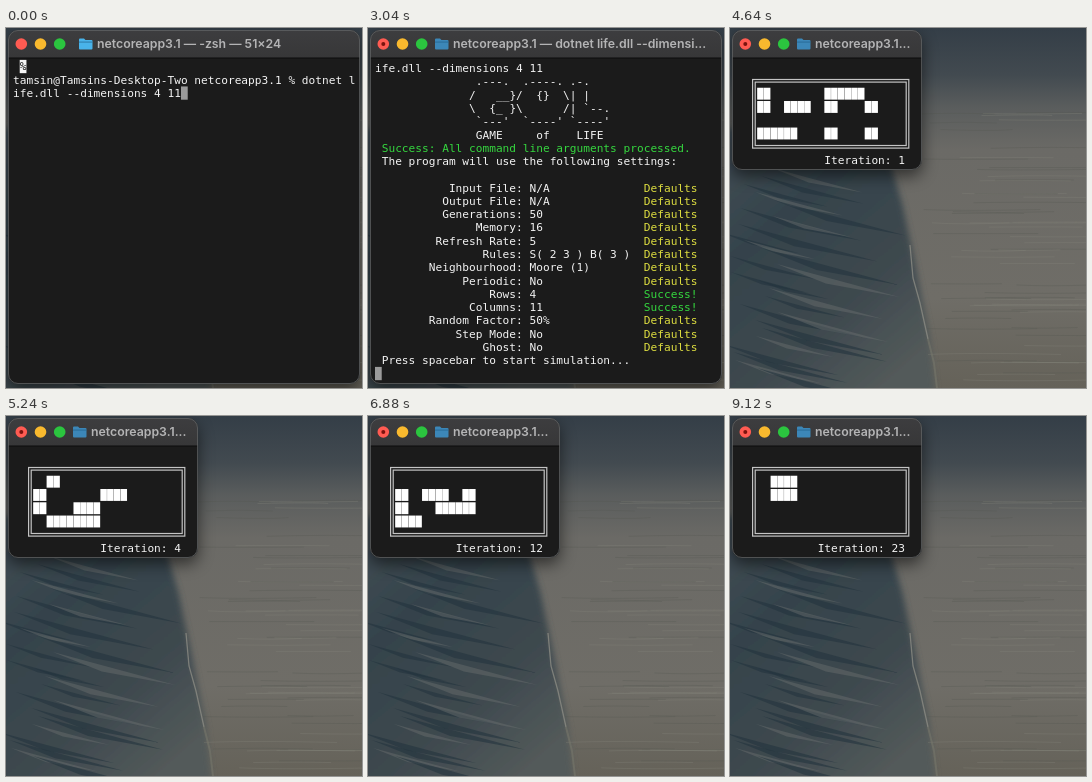
These frames come from a looping animation (356 px wide and 360 px high, 9160 ms). An HTML page:

```html
<!DOCTYPE html>
<html lang="en">
<head>
<meta charset="utf-8">
<title>Life in the terminal</title>
<style>
  html, body { margin: 0; width: 100%; height: 100%; overflow: hidden; background: #343d45; }
  svg { display: block; width: 100vw; height: 100vh; }
  text { white-space: pre; }
  .mono { font: 11.16px "DejaVu Sans Mono", monospace; fill: #f4f4f4; }
  .title { font: 600 12.3px Inter, sans-serif; fill: #b4b4b5; }
</style>
</head>
<body>
<svg id="stage" viewBox="0 0 356 360" preserveAspectRatio="none">
  <defs>
    <linearGradient id="sand" x2="0" y2="1">
      <stop offset="0" stop-color="#343e47"/>
      <stop offset=".13" stop-color="#424a50"/>
      <stop offset=".22" stop-color="#5a5d5d"/>
      <stop offset=".34" stop-color="#6b6a66"/>
      <stop offset=".75" stop-color="#6f6d67"/>
      <stop offset="1" stop-color="#656259"/>
    </linearGradient>
    <linearGradient id="slope" x2=".7" y2="1">
      <stop offset="0" stop-color="#434e55"/>
      <stop offset=".35" stop-color="#35434c"/>
      <stop offset=".7" stop-color="#3d484e"/>
      <stop offset="1" stop-color="#535a5a"/>
    </linearGradient>
    <linearGradient id="bar" x2="0" y2="1">
      <stop offset="0" stop-color="#3d3d3f"/>
      <stop offset="1" stop-color="#373738"/>
    </linearGradient>
    <filter id="soft" x="-20%" y="-20%" width="140%" height="140%"><feGaussianBlur stdDeviation="3"/></filter>
    <filter id="shade" x="-20%" y="-20%" width="140%" height="150%"><feGaussianBlur stdDeviation="8"/></filter>
  </defs>
  <g id="desk">
    <rect width="356" height="360" fill="url(#sand)"/>
    <path d="M-10 100H150L172 175L186 240L200 310L206 370H-10Z" fill="url(#slope)" filter="url(#soft)"/>
    <g id="streaks"/>
    <path d="M180 217L183 250L190 275L198 311" fill="none" stroke="#8b8b84" stroke-width="1.3" opacity=".8"/>
    <path d="M198 311L204 335L207 360" fill="none" stroke="#77766a" stroke-width="2" opacity=".6"/>
  </g>
</svg>
<script>
const LOOP = 9160, ENTER = 1000, OUTPUT = 1120, SHRINK = 4380, START = 4590, TICK = 205;
const COL = 6.72, ROW = 13.27, LEFT = 7;
const GREEN = '#35d83f', YELLOW = '#dede40';
const stage = document.getElementById('stage');

function el(parent, tag, attrs, content) {
  const node = document.createElementNS('http://www.w3.org/2000/svg', tag);
  for (const k in attrs) node.setAttribute(k, attrs[k]);
  if (content !== undefined) node.textContent = content;
  parent.appendChild(node);
  return node;
}
const group = parent => el(parent, 'g', {});
const rect = (parent, x, y, width, height, fill) => el(parent, 'rect', { x, y, width, height, fill });
const show = (node, on) => { node.style.display = on ? '' : 'none'; };
const colX = col => LEFT + col * COL;

// Character grid whose first row is centred on y = top
function print(parent, top, row, col, str, fill) {
  const node = el(parent, 'text', { class: 'mono', x: colX(col), y: top + row * ROW + 3.9 }, str);
  if (fill) node.style.fill = fill;
  return node;
}
function block(parent, top, row, col, fill) {
  return rect(parent, colX(col), top + row * ROW - 6.6, COL, ROW, fill);
}

function frame(w, h) {
  const g = group(stage);
  el(g, 'rect', { x: 2, y: 8, width: w, height: h, rx: 10, fill: '#000', opacity: .55, filter: 'url(#shade)' });
  el(g, 'rect', { x: 2, y: 2, width: w, height: h, rx: 10, fill: '#1b1b1b' });
  el(g, 'path', { d: `M2 30V12a10 10 0 0 1 10-10h${w - 20}a10 10 0 0 1 10 10V30Z`, fill: 'url(#bar)' });
  rect(g, 2, 29.5, w, 1, '#0c0c0c');
  el(g, 'rect', { x: 2.5, y: 2.5, width: w - 1, height: h - 1, rx: 9.5, fill: 'none', stroke: '#626466', 'stroke-opacity': .75 });
  ['#ff5b52', '#f9b92e', '#2bc53f'].forEach((fill, i) =>
    el(g, 'circle', { cx: 15.3 + i * 19.2, cy: 16, r: 5.8, fill }));
  return g;
}
function heading(parent, x, str, blue, busy) {
  const g = group(parent);
  el(g, 'path', { d: `M${x} 11.5q0-1 1-1h4l1.5 1.5h6q1 0 1 1v7.5q0 1-1 1h-11.500q-1 0-1-1Z`, fill: blue });
  rect(g, x, 13.7, 13.5, .7, '#1f5f88');
  el(g, 'text', { class: 'title', x: x + 18, y: 20.4 }, str);
  if (busy) el(g, 'circle', { cx: 15.3, cy: 16, r: 2, fill: '#7c130e' });
  return g;
}

function drawStreaks() {
  let seed = 7;
  const rnd = () => (seed = seed * 16807 % 2147483647) / 2147483647;
  const g = document.getElementById('streaks');
  for (let i = 0; i < 60; i++) {
    const y = 85 + rnd() * 270, x = 185 + rnd() * 110;
    el(g, 'path', { d: `M${x} ${y}q${30 + rnd() * 30} ${rnd() * 4 - 2} ${60 + rnd() * 80} 0`,
      fill: 'none', stroke: i % 2 ? '#86847b' : '#55564f', 'stroke-width': 1, opacity: .3 });
  }
  for (let i = 0; i < 26; i++) {
    const y = 140 + i * 8, x = -10 + rnd() * 60, len = 70 + rnd() * 75;
    el(g, 'path', { d: `M${x} ${y}l${len} ${len * .27}l${-len * .6} ${-len * .11}Z`,
      fill: i % 3 ? '#24343f' : '#6a7070', opacity: i % 3 ? .6 : .45 });
  }
}

// Large window: prompt, then settings
drawStreaks();
const big = frame(352, 354);
const zsh = heading(big, 73, 'netcoreapp3.1 — -zsh — 51×24', '#49b3ea', false);
const run = heading(big, 67, 'netcoreapp3.1 — dotnet life.dll --dimensi...', '#3c87b8', true);

const prompt = group(big), TOP = 38.5;
block(prompt, TOP, 0, 1, '#f4f4f4');
print(prompt, TOP, 0, 1, '%', '#111');
print(prompt, TOP, 1, 0, 'tamsin@Tamsins-Desktop-Two netcoreapp3.1 % dotnet l');
print(prompt, TOP, 2, 0, 'ife.dll --dimensions 4 11');
const caret = block(prompt, TOP, 2, 25, '#9b9b9b');
const caretNext = block(prompt, TOP, 3, 0, '#9b9b9b');

const output = group(big), TOP2 = 40.3;
print(output, TOP2, 0, 0, 'ife.dll --dimensions 4 11');
[
  " .---.  .----. .-.",
  "/   __}/  {}  \\| |",
  "\\  {_ }\\      /| `--.",
  " `---'  `----' `----'",
  " GAME     of    LIFE"
].forEach((line, i) => print(output, TOP2, i + 1, 14, line));
print(output, TOP2, 6, 1, 'Success: All command line arguments processed.', GREEN);
print(output, TOP2, 7, 1, 'The program will use the following settings:');
[
  ['Input File', 'N/A'], ['Output File', 'N/A'], ['Generations', '50'], ['Memory', '16'],
  ['Refresh Rate', '5'], ['Rules', 'S( 2 3 ) B( 3 )'], ['Neighbourhood', 'Moore (1)'],
  ['Periodic', 'No'], ['Rows', '4', true], ['Columns', '11', true],
  ['Random Factor', '50%'], ['Step Mode', 'No'], ['Ghost', 'No']
].forEach(([name, value, given], i) => {
  print(output, TOP2, i + 9, 0, (name + ':').padStart(22) + ' ' + value);
  print(output, TOP2, i + 9, 40, given ? 'Success!' : 'Defaults', given ? GREEN : YELLOW);
});
print(output, TOP2, 22, 1, 'Press spacebar to start simulation...');
block(output, TOP2, 23, 0, '#9b9b9b');

// Small window: the simulation
const small = frame(190, 140), TOP3 = 39.1;
heading(small, 67, 'netcoreapp3.1...', '#3c87b8', true);
[[22.6, 51.5, 156.2, 68.6], [25.2, 54.1, 151, 63.4]].forEach(([x, y, width, height]) =>
  el(small, 'rect', { x, y, width, height, fill: 'none', stroke: '#c4c4c4', 'stroke-width': 1.2 }));
const label = print(small, TOP3, 7, 0, '');

const first = ['10000111000', '10110100100', '00000000000', '11100100100'].map(r => [...r].map(Number));
function step(cells) {
  return cells.map((line, r) => line.map((alive, c) => {
    let n = -alive;
    for (let y = r - 1; y <= r + 1; y++)
      for (let x = c - 1; x <= c + 1; x++) n += cells[y]?.[x] || 0;
    return +(n === 3 || (alive && n === 2));
  }));
}
const history = [first];
while (history.length < 24) history.push(step(history[history.length - 1]));

const cellNodes = first.map((line, r) => line.map((_, c) => {
  const g = group(small);
  for (const half of [0, 1])
    rect(g, colX(3 + c * 2 + half), TOP3 + (r + 2) * ROW - 5.9, COL - .2, 11.9, '#fff');
  return g;
}));

function draw(t) {
  const sim = t >= SHRINK, busy = t >= ENTER, printed = t >= OUTPUT;
  show(big, !sim);
  show(small, sim);
  show(zsh, !busy);
  show(run, busy);
  show(prompt, !printed);
  show(output, printed);
  show(caret, !busy);
  show(caretNext, busy);
  const gen = Math.floor((t - START) / TICK);
  const cells = history[gen];
  const note = cells ? 'Iteration: ' + (gen + 1) : '';
  label.textContent = note;
  label.setAttribute('x', colX(25 - note.length));
  cellNodes.forEach((line, r) => line.forEach((node, c) => show(node, cells && cells[r][c])));
}

const begin = performance.now();
function tick() {
  draw((performance.now() - begin) % LOOP);
  requestAnimationFrame(tick);
}
tick();
</script>
</body>
</html>
```
